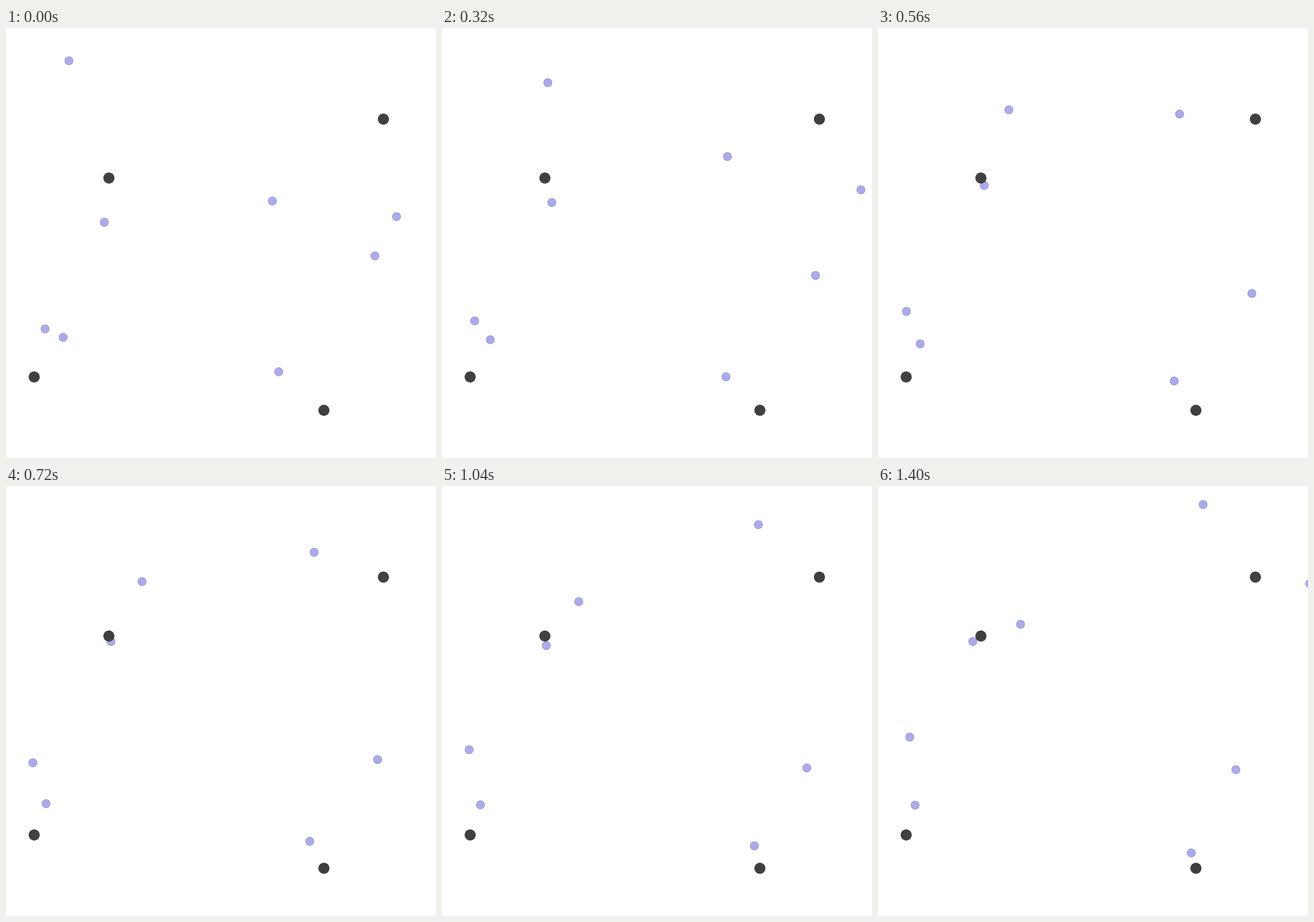
These frames come from a looping animation (748 px wide and 748 px high, 1.44 s). A matplotlib script:

```python
import numpy as np
import matplotlib.pyplot as plt
from matplotlib.animation import FuncAnimation
from matplotlib.patches import Circle

SIZE, DPI = 748, 64
FRAMES, INTERVAL = 36, 40

ANCHORS = [(656.5, 158.5), (179, 261), (49, 607), (553, 665)]

# Waypoints of each drifting dot at the frames in KNOTS
KNOTS = np.array([0, 4, 8, 14, 22, 30, 35])
PATHS = np.array([
    [(109.5, 57), (140, 70), (184, 95), (227.7, 142.3),
     (237.5, 184.5), (240.5, 218), (248, 240.5)],
    [(171, 338), (181.6, 325), (191, 303.5), (184.8, 274),
     (183, 274.8), (176.5, 276.6), (165, 270.5)],
    [(463.3, 301), (476, 272.4), (496.4, 223.7), (524.7, 149.7),
     (543.5, 89.7), (557, 48.7), (565.5, 32.2)],
    [(679.3, 328), (700, 309.2), (728.8, 281.5), (759, 243),
     (761, 202), (753.6, 176), (751, 170)],
    [(641.8, 396.4), (645.7, 408.5), (649.8, 430.4), (650.3, 461.8),
     (640.6, 485), (629, 493), (622.5, 493.5)],
    [(68, 523.5), (63.3, 518.6), (56.8, 509.4), (49.4, 493),
     (46, 469.8), (50, 448.5), (55.2, 436.8)],
    [(99.4, 538), (93.5, 539.5), (84, 542.2), (73.4, 549.5),
     (67.8, 554), (66, 555), (64.5, 555.2)],
    [(474.3, 598), (482.2, 601.8), (494, 606.7), (515.2, 614),
     (538.3, 622), (545, 630.8), (545, 638.2)],
])


def spline(knots, values, t):
    """Natural cubic spline along the first axis of values."""
    n, h = len(knots), np.diff(knots)
    slope = np.diff(values, axis=0) / h[:, None]
    system, rhs = np.eye(n), np.zeros_like(values)
    for i in range(1, n - 1):
        system[i, i - 1:i + 2] = h[i - 1], 2 * (h[i - 1] + h[i]), h[i]
        rhs[i] = 6 * (slope[i] - slope[i - 1])
    bend = np.linalg.solve(system, rhs)
    k = np.clip(np.searchsorted(knots, t, side="right") - 1, 0, n - 2)
    d, w = (t - knots[k])[:, None], h[k][:, None]
    start = slope[k] - w * (2 * bend[k] + bend[k + 1]) / 6
    return (values[k] + start * d + bend[k] / 2 * d**2
            + (bend[k + 1] - bend[k]) / (6 * w) * d**3)


tracks = [spline(KNOTS, path, np.arange(FRAMES)) for path in PATHS]

fig = plt.figure(figsize=(SIZE / DPI, SIZE / DPI), dpi=DPI, facecolor="white")
ax = fig.add_axes([0, 0, 1, 1])
ax.set(xlim=(0, SIZE), ylim=(SIZE, 0))
ax.axis("off")


def add_dot(center, radius, fill, edge, z):
    return ax.add_patch(Circle(center, radius, facecolor=fill, edgecolor=edge,
                               linewidth=72 / DPI, zorder=z))


dots = [add_dot(track[0], 7.1, "#ababeb", "#9494cc", 1) for track in tracks]
for anchor in ANCHORS:
    add_dot(anchor, 9.1, "#404040", "#3a3a3a", 2)


def update(frame):
    for dot, track in zip(dots, tracks):
        dot.center = track[frame]
    return dots


anim = FuncAnimation(fig, update, frames=FRAMES, interval=INTERVAL,
                     init_func=lambda: update(0), repeat=True, repeat_delay=0)
plt.show()
```
